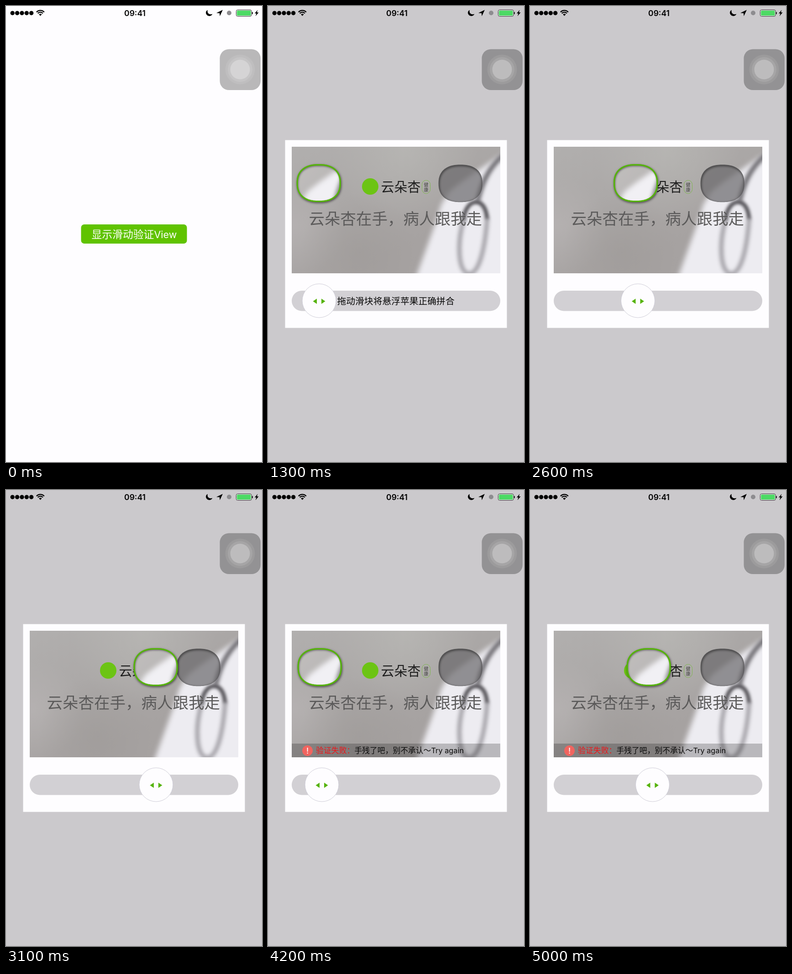
An HTML page with a canvas that plays this animation: 561x998 px, repeating every 5100 ms.

```html
<!DOCTYPE html>
<html lang="zh-CN">
<head>
<meta charset="utf-8">
<title>滑动验证</title>
<style>
  html, body { margin: 0; width: 100%; height: 100%; overflow: hidden; background: #fefdff; }
  canvas { display: block; width: 561px; height: 998px; }
</style>
</head>
<body>
<canvas id="stage" width="561" height="998"></canvas>
<script>
const W = 561, H = 998, LOOP = 5100, STEP = 100;
const ctx = document.getElementById('stage').getContext('2d');
const CJK = '"Noto Sans CJK SC", "Noto Sans CJK", sans-serif';
const LATIN = 'Inter, sans-serif';
const GREEN = '#56b30c';
const PHOTO = { x: 52, y: 308, w: 457, h: 277 };
const HOLE = { x: 421.7, y: 388.3 };
const PIECE_X = 111.2, KNOB_X = 112;
const RETURN_AT = 3428, RETURN_MS = 300;

// Drag offsets as [time, distance]
const knobPath = [[2300, 0], [2400, 14], [2500, 62], [2600, 124.5], [2700, 172], [2800, 204],
  [2900, 215], [3430, 220]];
const piecePath = [[2300, 0], [2400, 9], [2500, 55], [2600, 120.5], [2700, 170], [2800, 203],
  [2900, 215], [3430, 220]];
const knobPath2 = [[4100, 0], [4200, 6], [4400, 24], [4600, 55.5], [4800, 101], [5000, 156.5]];
const piecePath2 = [[4100, 0], [4200, 2], [4400, 14], [4600, 41], [4800, 91], [5000, 149]];

const clamp = v => Math.min(1, Math.max(0, v));
const smooth = v => v * v * (3 - 2 * v);

function along(path, t) {
  if (t <= path[0][0]) return path[0][1];
  for (let i = 1; i < path.length; i++) {
    const [t0, a] = path[i - 1], [t1, b] = path[i];
    if (t <= t1) return a + (b - a) * (t - t0) / (t1 - t0);
  }
  return path[path.length - 1][1];
}

function text(c, str, x, cy, size, color, weight = 400, family = CJK, align = 'left') {
  c.font = `${weight} ${size}px ${family}`;
  c.fillStyle = color;
  c.textAlign = align;
  c.fillText(str, x, cy + size * 0.38);
}

function box(c, x, y, w, h, r, fill) {
  c.beginPath();
  c.roundRect(x, y, w, h, r);
  c.fillStyle = fill;
  c.fill();
}

function disc(c, x, y, r, fill) {
  c.beginPath();
  c.arc(x, y, r, 0, Math.PI * 2);
  c.fillStyle = fill;
  c.fill();
}

function poly(c, points, fill) {
  c.beginPath();
  points.forEach(([x, y]) => c.lineTo(x, y));
  c.closePath();
  c.fillStyle = fill;
  c.fill();
}

// Slightly squared circle shared by the piece and its hole
function oval(c, x, y, grow = 0) {
  const bend = v => Math.sign(v) * Math.abs(v) ** 0.84;
  c.beginPath();
  for (let i = 0; i < 120; i++) {
    const a = i / 60 * Math.PI;
    c.lineTo(x + (48 + grow) * bend(Math.cos(a)), y + (41 + grow) * bend(Math.sin(a)));
  }
  c.closePath();
}

function glow(c, x, y, r, rgb, alpha) {
  const g = c.createRadialGradient(x, y, 0, x, y, r);
  g.addColorStop(0, `rgba(${rgb},${alpha})`);
  g.addColorStop(1, `rgba(${rgb},0)`);
  c.fillStyle = g;
  c.fillRect(0, 0, W, H);
}

// Soft backdrop: grey wall, white coat, blurred tube
function makePhoto() {
  const cv = document.createElement('canvas');
  cv.width = W;
  cv.height = H;
  const c = cv.getContext('2d');
  const wall = c.createLinearGradient(52, 308, 180, 585);
  wall.addColorStop(0, '#b1afae');
  wall.addColorStop(1, '#a6a2a1');
  c.fillStyle = wall;
  c.fillRect(0, 0, W, H);
  glow(c, 300, 315, 160, '184,183,180', 0.8);
  glow(c, 60, 480, 110, '184,180,180', 0.7);
  glow(c, 200, 540, 130, '156,152,150', 0.5);

  c.filter = 'blur(6px)';
  poly(c, [[322, 600], [349, 525], [366, 478], [380, 434], [398, 405], [424, 385],
    [460, 360], [530, 312], [530, 600]], '#edecf1');
  c.filter = 'blur(4px)';
  c.lineCap = 'round';
  c.strokeStyle = '#67656a';
  c.lineWidth = 10;
  c.beginPath();
  c.moveTo(520, 322);
  c.bezierCurveTo(488, 350, 472, 376, 460, 424);
  c.stroke();
  c.filter = 'blur(3px)';
  c.strokeStyle = '#58565b';
  c.lineWidth = 9;
  c.beginPath();
  c.moveTo(429, 467);
  c.bezierCurveTo(432, 422, 475, 412, 480, 464);
  c.stroke();
  c.filter = 'blur(4px)';
  c.strokeStyle = '#99979d';
  c.lineWidth = 8;
  c.beginPath();
  c.moveTo(428, 470);
  c.bezierCurveTo(414, 520, 416, 585, 441, 586);
  c.bezierCurveTo(462, 585, 475, 535, 480, 468);
  c.stroke();
  return cv;
}
const photo = makePhoto();

// Dark rim along the inside of the oval
function innerShade(c, x, y, alpha) {
  c.save();
  oval(c, x, y);
  c.clip();
  c.filter = 'blur(2px)';
  c.strokeStyle = `rgba(0,0,0,${alpha})`;
  c.lineWidth = 5;
  oval(c, x + 1, y + 2, 1);
  c.stroke();
  c.restore();
}

function drawHole() {
  oval(ctx, HOLE.x, HOLE.y);
  ctx.fillStyle = 'rgba(106,105,107,0.7)';
  ctx.fill();
  innerShade(ctx, HOLE.x, HOLE.y, 0.45);
}

function drawPiece(x) {
  const y = HOLE.y - 0.7;
  ctx.save();
  ctx.shadowColor = 'rgba(0,0,0,0.6)';
  ctx.shadowBlur = 5;
  ctx.shadowOffsetX = 1;
  ctx.shadowOffsetY = 2;
  oval(ctx, x, y, 0.5);
  ctx.fillStyle = GREEN;
  ctx.fill();
  ctx.restore();

  ctx.save();
  oval(ctx, x, y);
  ctx.clip();
  ctx.drawImage(photo, x - HOLE.x, 0);
  ctx.fillStyle = 'rgba(255,255,255,0.2)';
  ctx.fill();
  ctx.restore();
  innerShade(ctx, x, y, 0.55);
  oval(ctx, x, y, -1);
  ctx.strokeStyle = GREEN;
  ctx.lineWidth = 3.2;
  ctx.stroke();
}

function drawBrand() {
  disc(ctx, 224, 395, 18, '#6cc414');
  text(ctx, '云朵杏', 247.5, 396, 29, '#1c1c1c', 300);
  ctx.beginPath();
  ctx.roundRect(337.5, 381.5, 18, 29, 9);
  ctx.strokeStyle = '#7fb650';
  ctx.lineWidth = 1;
  ctx.stroke();
  text(ctx, '健', 346.5, 391.5, 10, '#444', 400, CJK, 'center');
  text(ctx, '康', 346.5, 402.5, 10, '#444', 400, CJK, 'center');
  text(ctx, '云朵杏在手，病人跟我走', 89.5, 465, 34.5, '#5b5a5a', 300);
}

function drawError(rise) {
  if (rise <= 0) return;
  const top = 585 - 30 * rise, mid = top + 15;
  ctx.fillStyle = 'rgba(0,0,0,0.22)';
  ctx.fillRect(PHOTO.x, top, PHOTO.w, 30);
  disc(ctx, 86.5, mid + 0.5, 11.5, '#f0645f');
  text(ctx, '!', 86.5, mid + 0.3, 17, '#fff', 500, LATIN, 'center');
  text(ctx, '验证失败：', 105, mid, 16.9, '#ee1418');
  text(ctx, '手残了吧，别不承认～', 189.5, mid, 16.8, '#0a0a0a');
  text(ctx, 'Try again', 357.5, mid, 16.3, '#0a0a0a', 400, LATIN);
}

function drawSlider(x, hint) {
  box(ctx, 52, 623, 457, 44.5, 22.2, '#d2d0d4');
  if (hint) text(ctx, '拖动滑块将悬浮苹果正确拼合', 151.5, 645, 19.8, '#080808');
  disc(ctx, x, 645, 37, '#fefdff');
  ctx.strokeStyle = '#cfcdd8';
  ctx.lineWidth = 1;
  ctx.stroke();
  for (const s of [-1, 1])
    poly(ctx, [[x + s * 13.5, 646.3], [x + s * 5, 640.6], [x + s * 5, 652]], GREEN);
}

function drawPopup(t) {
  const back = smooth(clamp((t - RETURN_AT) / RETURN_MS));
  const second = t >= 4100;
  const knob = second ? along(knobPath2, t) : along(knobPath, t) * (1 - back);
  const piece = second ? along(piecePath2, t) : along(piecePath, t) * (1 - back);
  const dragging = (t >= 2400 && t < 3500) || t >= 4200;

  ctx.fillStyle = '#cbc9cc';
  ctx.fillRect(0, 0, W, H);
  ctx.fillStyle = '#fefdff';
  ctx.fillRect(37.5, 293.5, 486, 411);

  ctx.save();
  ctx.beginPath();
  ctx.rect(PHOTO.x, PHOTO.y, PHOTO.w, PHOTO.h);
  ctx.clip();
  ctx.drawImage(photo, 0, 0);
  drawBrand();
  drawHole();
  drawPiece(PIECE_X + piece);
  drawError(back);
  ctx.restore();

  drawSlider(KNOB_X + knob, !dragging);
}

function drawHome(t) {
  ctx.fillStyle = '#fefdff';
  ctx.fillRect(0, 0, W, H);
  box(ctx, 164.5, 478, 232, 42, 7, '#60c300');
  const color = t >= 1200 ? 'rgba(255,255,255,0.27)' : '#fff';
  text(ctx, '显示滑动验证', 187.5, 499.5, 22.8, color, 300);
  text(ctx, 'View', 324.5, 499.8, 21.5, color, 400, LATIN);
}

function drawStatus() {
  for (let i = 0; i < 5; i++) disc(ctx, 14.2 + i * 10.35, 15.5, 4.7, '#000');

  ctx.strokeStyle = '#000';
  ctx.lineWidth = 2.3;
  for (const r of [7.6, 11.6]) {
    ctx.beginPath();
    ctx.arc(75.3, 21.3, r, -Math.PI * 0.76, -Math.PI * 0.24);
    ctx.stroke();
  }
  ctx.beginPath();
  ctx.moveTo(75.3, 21.8);
  ctx.arc(75.3, 21.3, 4.4, -Math.PI * 0.76, -Math.PI * 0.24);
  ctx.fillStyle = '#000';
  ctx.fill();

  text(ctx, '09:41', 282.5, 15.3, 17.5, '#000', 600, LATIN, 'center');

  ctx.beginPath();
  ctx.moveTo(442, 8.8);
  ctx.bezierCurveTo(435, 12, 438, 22, 446, 22);
  ctx.bezierCurveTo(449, 22, 451.5, 20, 452.3, 17.6);
  ctx.bezierCurveTo(445, 20, 440, 15, 442, 8.8);
  ctx.fillStyle = '#000';
  ctx.fill();
  poly(ctx, [[475, 8.5], [461, 15.3], [468, 15.8], [468.6, 22.3]], '#000');
  disc(ctx, 489, 15.3, 5, '#8d8c8f');

  ctx.beginPath();
  ctx.roundRect(504.5, 8.5, 33.5, 14, 3);
  ctx.fillStyle = '#fefdff';
  ctx.fill();
  ctx.strokeStyle = '#222';
  ctx.lineWidth = 1;
  ctx.stroke();
  box(ctx, 506, 10, 30.5, 11, 1.5, '#4cd964');
  box(ctx, 539, 13, 2, 5, 1, '#222');
  poly(ctx, [[551.5, 8.5], [545, 16.3], [548.6, 16.3], [546.8, 22.3], [553.6, 14], [549.8, 14]], '#000');
}

function drawTouchPad() {
  box(ctx, 468.5, 94.5, 89.5, 89.5, 20, 'rgba(0,0,0,0.275)');
  disc(ctx, 513, 139, 32.5, 'rgba(255,255,255,0.08)');
  disc(ctx, 513, 139, 27, 'rgba(255,255,255,0.1)');
  disc(ctx, 513, 139, 21.5, 'rgba(255,255,255,0.26)');
}

function draw(now) {
  const t = Math.floor((now % LOOP) / STEP) * STEP;
  if (t < 1300) drawHome(t);
  else drawPopup(t);
  drawTouchPad();
  drawStatus();
  requestAnimationFrame(() => draw(performance.now() - start));
}

const start = performance.now();
draw(0);
</script>
</body>
</html>
```
